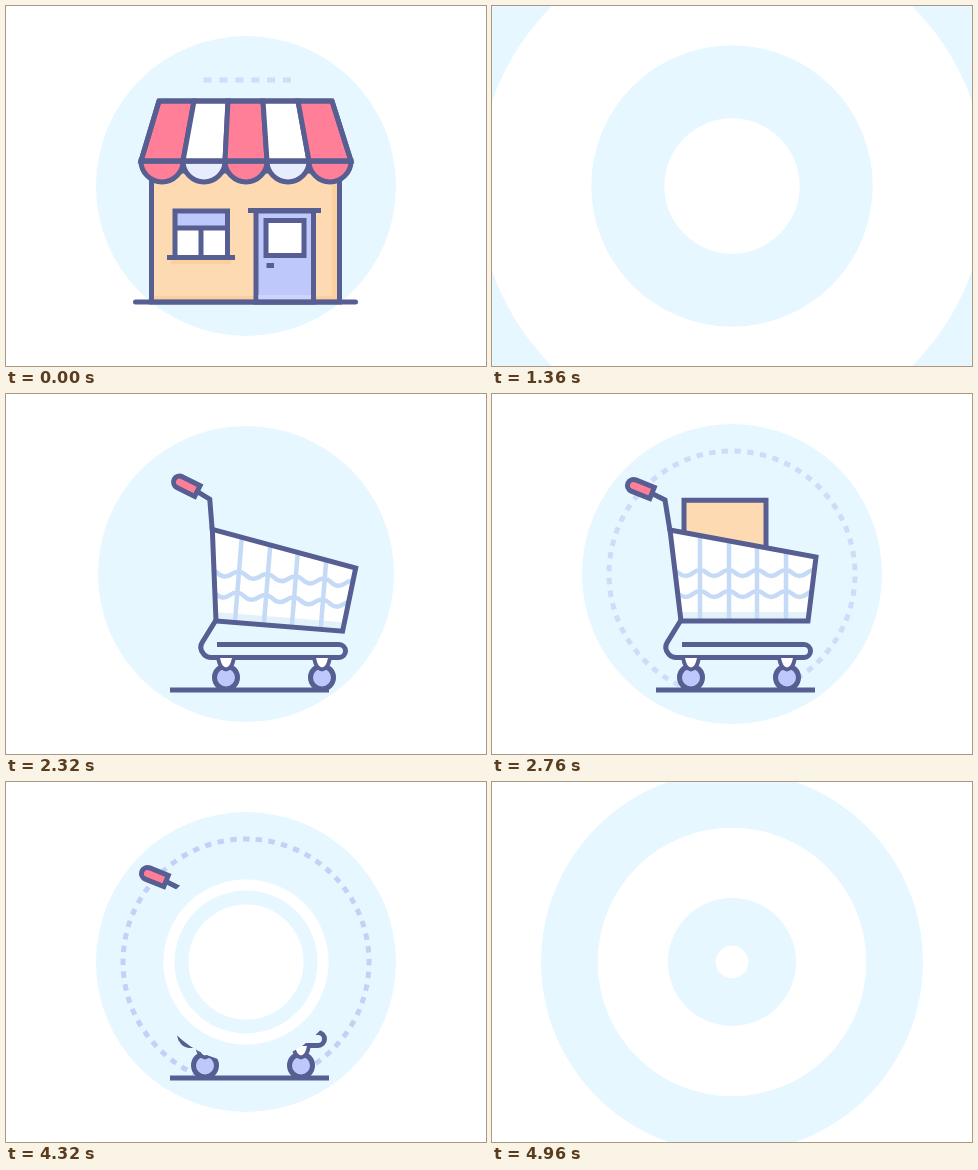
Write an HTML page that moves like this. It is 480 px wide and 360 px high and loops after 5000 ms.

```html
<!DOCTYPE html>
<html lang="en">
<head>
<meta charset="utf-8">
<title>Shop and cart</title>
<style>
  html, body { margin: 0; width: 100%; height: 100%; overflow: hidden; background: #fff; }
  svg { display: block; width: 100vw; height: 100vh; }
  .ink { stroke: #565e92; stroke-width: 5; fill: none; }
  .dash { stroke: #c3cdf5; stroke-width: 5; fill: none; }
  .mesh { stroke: #c5daf6; stroke-width: 4.5; fill: none; }
  .pink { fill: #ff7f98; }
  .white { fill: #fff; }
  .lilac { fill: #bfc8fb; }
  .sand { fill: #fedab2; }
  .sky { fill: #e6f7ff; }
</style>
</head>
<body>
<svg viewBox="0 0 480 360">
  <defs>
    <clipPath id="discClip"><circle id="clipDisc" cx="240" cy="180" r="150"/></clipPath>
    <clipPath id="basketClip"><path d="M178 136L324 163L316 227H189Z"/></clipPath>
    <clipPath id="aboveGround"><path d="M0 0H480V293H0Z"/></clipPath>
  </defs>

  <circle id="disc" class="sky" cx="240" cy="180" r="150"/>
  <circle id="hole" class="white" cx="240" cy="180" r="0"/>

  <g id="shop">
    <path id="shopDash" class="dash" d="M190 74H292" stroke-dasharray="8 7.9"/>
    <path class="ink sand" d="M145.500 165H333.500V296H145.500Z"/>
    <path fill="#fccf9f" d="M326 178H331V293.500H326ZM148 290H326V293.500H148ZM165 254H225V258H165Z"/>
    <path class="white" d="M169 205H221V250H169Z"/>
    <path class="lilac" d="M169 205H221V221H169Z"/>
    <path class="ink" d="M169 251V205H221.500V251M169 222H221M195 222V250M161 251.500H229"/>
    <path class="ink lilac" d="M250 205H307.500V296H250Z"/>
    <path fill="#cdd5fb" d="M252.500 289H305V293.500H252.500Z"/>
    <path class="ink white" d="M260 214.500H298V249.500H260Z"/>
    <path class="ink" d="M260.500 259.500H268M242 204.500H315"/>
    <g id="awning"></g>
    <path class="ink" stroke-linejoin="round" d="M153 95H326L345 155H135Z"/>
    <path class="ink" stroke-linecap="round" d="M129.500 296H349.500"/>
  </g>

  <g id="cartScene" clip-path="url(#discClip)">
    <g clip-path="url(#aboveGround)">
      <circle id="ring" class="dash" cx="240" cy="180" r="123" stroke-dasharray="6.440 6.440"/>
    </g>
    <path id="floor" class="ink"/>
    <g id="cart">
      <g id="top">
        <path class="ink sand item" d="M192 109H274V160H192Z"/>
        <g class="item">
          <path class="lilac" d="M202 141L234 120L258 156H206Z"/>
          <path fill="#aab5e4" d="M206 138H246L258 156H206Z"/>
          <path class="ink" d="M202 141L234 120L256 152"/>
        </g>
        <path class="ink pink item" d="M249 129H311V180H249Z"/>
        <g clip-path="url(#basketClip)">
          <path class="white" d="M170 130H330V230H170Z"/>
          <path fill="#e3f2fa" d="M170 218H330V228H170Z"/>
          <path id="mesh" class="mesh"/>
        </g>
        <path class="ink" d="M178 136L324 163L316 227H189Z"/>
        <path class="ink" d="M160 99.500L173 106L178 137"/>
        <path class="ink pink" transform="translate(141.500 91.500) rotate(22)" d="M0 -6H20V6H0A6 6 0 0 1 0 -6Z"/>
      </g>
      <path class="ink" d="M189 226L176 247Q171 254 177 260.500Q180 263.500 184 263.500H312A6.500 6.500 0 0 0 312 250.500H190"/>
      <g id="wheels"></g>
    </g>
  </g>
  <g id="waves"></g>
</svg>
<script>
const LOOP = 5000;
const $ = id => document.getElementById(id);
const set = (el, attrs) => { for (const k in attrs) el.setAttribute(k, attrs[k]); };
const show = (el, on) => { el.style.display = on ? '' : 'none'; };

// Smoothly eased value through [time, value] points.
function key(t, points) {
  if (t <= points[0][0]) return points[0][1];
  for (let i = 1; i < points.length; i++) {
    const [a, from] = points[i - 1], [b, to] = points[i];
    if (t < b) {
      const u = (t - a) / (b - a);
      return from + (to - from) * u * u * (3 - 2 * u);
    }
  }
  return points[points.length - 1][1];
}

function buildAwning() {
  const topX = [153, 188, 222, 257, 292, 326];
  const lowX = i => 135 + 42 * i;
  let html = '';
  for (let i = 0; i < 5; i++) {
    const pink = i % 2 === 0;
    html += `<path class="ink" style="fill:${pink ? '#ff7f98' : '#e8edfd'}" d="M${lowX(i)} 155a21 21 0 0 0 42 0Z"/>`;
    html += `<path class="ink ${pink ? 'pink' : 'white'}" d="M${topX[i]} 95H${topX[i + 1]}L${lowX(i + 1)} 155H${lowX(i)}Z"/>`;
  }
  $('awning').innerHTML = html;
}

function buildCart() {
  const wave = 'c7 0 7 6 14.25 6s7 -6 14.25 -6'.repeat(6);
  const bars = [208, 237, 265, 294].map(x => `M${x} 130V226`).join('');
  set($('mesh'), { d: `${bars}M179.5 176${wave}M179.5 197${wave}` });
  $('wheels').innerHTML = [199, 295].map(x =>
    `<circle class="ink lilac" cx="${x}" cy="283.5" r="11.5"/>
     <path class="ink white" style="stroke-width:4" d="M${x - 8} 264Q${x - 6} 275 ${x} 275.5Q${x + 6} 275 ${x + 8} 264"/>`).join('');
}

// Start times of ripples; colours alternate from sky to white.
const bursts = [
  { end: 1640, starts: [780, 801, 815, 834, 934, 1010, 1100, 1180] },
  { end: LOOP, starts: [4100, 4121, 4135, 4154, 4340, 4440, 4657, 4706, 4785, 4872] }
];
const ripples = bursts.flatMap(({ end, starts }) => starts.map((start, i) => {
  const el = document.createElementNS('http://www.w3.org/2000/svg', 'circle');
  set(el, { cx: 240, cy: 180, class: i % 2 ? 'white' : 'sky' });
  $('waves').append(el);
  return { el, start, end };
}));
const items = [...document.querySelectorAll('.item')];

function draw(t) {
  const early = t < 1250;
  const radius = early ? 150 : key(t, [[1662, 0], [2000, 173], [2200, 146], [2320, 148], [2440, 150]]);
  const late = t > 1900 && t < 4600;
  show($('disc'), early || (t > 1662 && t < 4600));
  set($('disc'), { r: radius });
  set($('clipDisc'), { r: radius });
  set($('hole'), { r: key(t, [[1730, 0], [1790, 12], [1880, 0]]) });

  show($('shop'), early);
  set($('shopDash'), {
    'stroke-dashoffset': -(7.5 + 0.0131 * t),
    opacity: key(t, [[-400, 0], [300, 1]])
  });

  show($('cartScene'), late);
  if (late) {
    set($('ring'), {
      transform: `rotate(${-90 - 1.5 + (t - 3320) * 0.006} 240 180)`,
      opacity: key(t, [[2500, 0], [2900, 0.9]])
    });
    set($('floor'), { d: `M164 296H${key(t, [[1950, 164], [2280, 323]])}` });
    set($('cart'), { transform: `translate(${key(t, [[1900, -290], [2320, 21], [2680, 0]])} 0)` });
    const tilt = key(t, [[1960, -5], [2320, 4.6], [2540, -2], [2720, 0]]);
    set($('top'), { transform: `rotate(${tilt} 189 227)` });
    items.forEach((el, i) => {
      const start = 2560 + i * 130;
      const y = key(t, [[start, 48], [start + 230, -5], [start + 360, 0]]);
      show(el, t > start);
      set(el, { transform: `translate(0 ${y})` });
    });
  }

  for (const { el, start, end } of ripples) {
    const on = t > start && t < end;
    show(el, on);
    if (on) set(el, { r: Math.min(320, 0.002066 * (t - start) ** 2) });
  }
}

buildAwning();
buildCart();
const began = performance.now();
function tick() {
  draw((performance.now() - began) % LOOP);
  requestAnimationFrame(tick);
}
draw(0);
requestAnimationFrame(tick);
</script>
</body>
</html>
```
